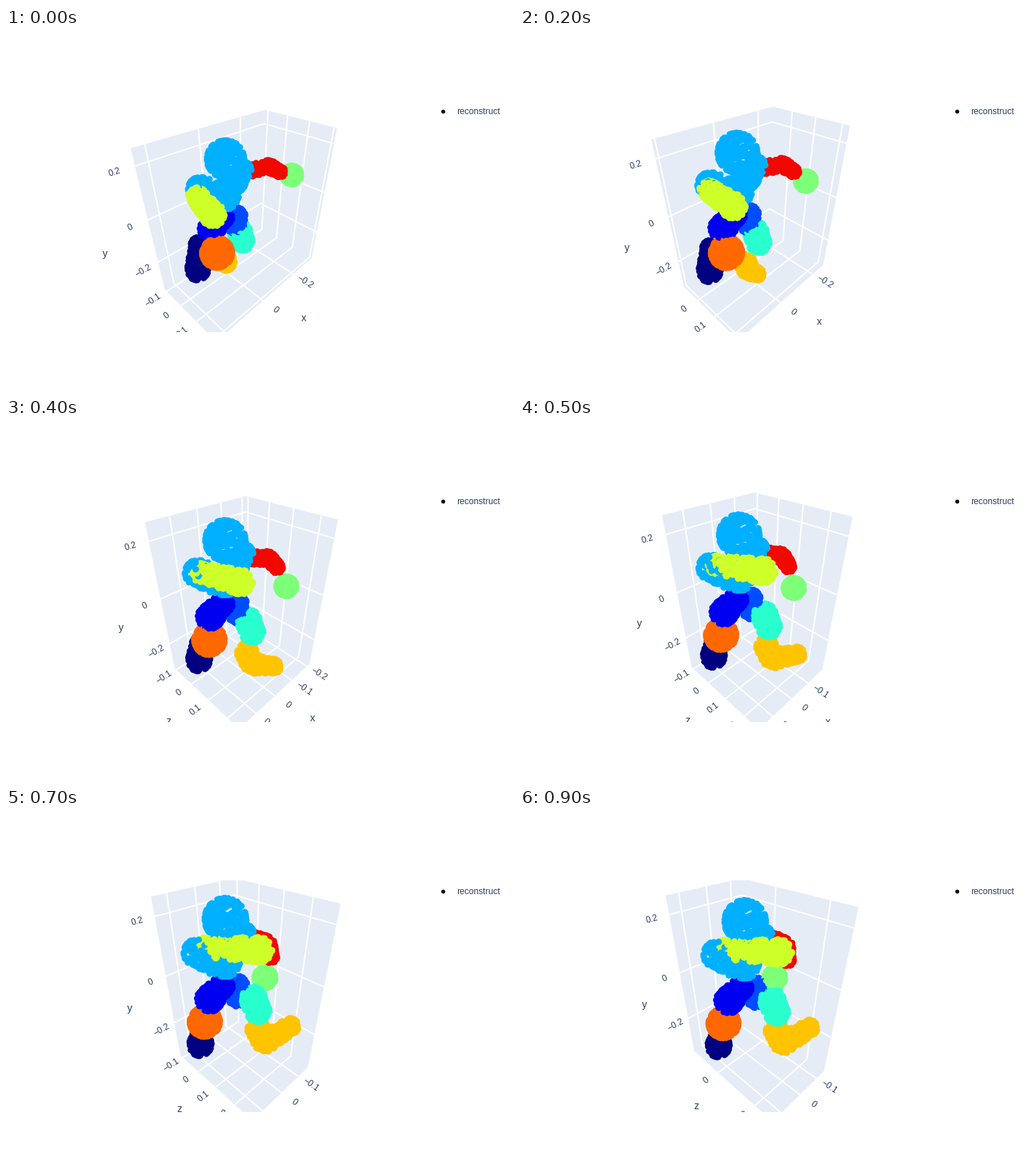
Animation of 700 by 500 pixels, one loop 1 s. Source, as a matplotlib script:

```python
import numpy as np
import matplotlib.pyplot as plt
from matplotlib.animation import FuncAnimation
from matplotlib.colors import to_rgb
from matplotlib.patches import Polygon, Rectangle

DPI = 100
PX = 72 / DPI
FRAMES, INTERVAL = 10, 100
INK, WALL = "#2a3f5f", "#e5ecf6"
CENTER = np.array([326, 260])
FOCAL = 160 / np.tan(np.pi / 8)
EYE = 1.25 * np.sqrt(3)
LABEL_GAP, TITLE_GAP = 0.128, 0.33
DOT, DOT_MARGIN = 9, 0.01

plt.rcParams["font.family"] = "Liberation Sans"
fig = plt.figure(figsize=(7, 5), dpi=DPI, facecolor="white")
ax = fig.add_axes([0, 0, 1, 1])
rng = np.random.default_rng(4)


def swing(frame, pace):
    t = min(frame / pace, 1)
    return t * t * (3 - 2 * t)


def axis_limits(frame):
    """The data range on x, y and z, which follows the stride."""
    narrow = np.sin(np.pi / 2 * frame / 9)
    lift = np.exp(-((frame - 3.2) / 1.5) ** 2)
    back = np.interp(frame, [0, 1, 3, 4, 8, 9], [-.116, -.086, -.098, -.112, -.12, -.159])
    return np.array([
        (-.342 + .192 * narrow, .245 - .102 * narrow),
        (-.356 - .0022 * frame + .045 * lift, .256),
        (back, .211 + .071 * swing(frame, 7))])


class Part:
    """Dots on the skin of a chain of balls that swings from one pose to another."""

    def __init__(self, color, radii, start, end=None, arc=(0, 0, 0), pace=7, count=240):
        self.color, self.pace = to_rgb(color), pace
        self.start = np.array(start)
        self.end = self.start if end is None else np.array(end)
        self.arc = np.array(arc)
        links = np.arange(len(radii))
        self.along = rng.uniform(-.35, links[-1] + .35, count).clip(0, links[-1])
        skin = rng.normal(size=(count, 3))
        skin /= np.linalg.norm(skin, axis=1, keepdims=True)
        radius = np.interp(self.along, links, radii) - DOT_MARGIN
        self.skin = skin * radius[:, None]

    def dots(self, frame):
        s = swing(frame, self.pace)
        joints = self.start + (self.end - self.start) * s + self.arc * s * (1 - s)
        links = np.arange(len(joints))
        return self.skin + np.column_stack([np.interp(self.along, links, v) for v in joints.T])


BODY = [
    # head and trunk
    Part("#00b0ff", [.07], [(0, .187, .018)], count=330),
    Part("#00b0ff", [.041, .06, .049],
         [(-.098, .108, 0), (0, .035, 0), (.098, .108, 0)], count=480),
    # hips
    Part("#004cff", [.042, .042], [(-.05, -.065, .015), (-.05, -.122, .01)]),
    Part("#0000f1", [.046, .052], [(.02, -.04, .01), (.07, -.07, .004)], count=320),
    # far arm
    Part("#f10800", [.032, .034, .03],
         [(-.135, .1, .014), (-.2, .103, .036), (-.255, .064, .052)],
         [(-.125, .095, .018), (-.13, .086, .07), (-.125, .04, .087)],
         arc=(0, -.05, 0), pace=9, count=300),
    Part("#7dff7a", [.047], [(-.305, .041, .074)], [(-.11, -.04, .046)],
         arc=(-.045, -.2, .12), pace=9),
    # near arm
    Part("#ceff29", [.038, .044], [(.13, .105, .024), (.15, .093, .124)],
         [(.075, .12, .005), (.005, .14, .158)], count=330),
    # near leg
    Part("#ff6800", [.063], [(.1, -.127, .067)], [(.08, -.18, -.023)], count=300),
    Part("#000080", [.036, .054], [(.11, -.144, -.036), (.11, -.297, -.059)],
         [(.08, -.26, -.06), (.08, -.328, -.07)], count=340),
    # far leg
    Part("#29ffce", [.051, .051], [(-.06, -.145, .02), (-.06, -.185, .035)],
         [(-.06, -.095, .08), (-.06, -.135, .105)], arc=(0, -.06, .02), count=320),
    Part("#ffc400", [.048, .048, .035],
         [(-.02, -.315, -.03), (-.02, -.325, -.03), (-.02, -.33, -.02)],
         [(-.06, -.22, .107), (-.06, -.265, .142), (-.06, -.12, .245)],
         arc=[(0, -.07, .07), (0, -.12, .1), (0, -.19, .27)], count=440),
]


def depth(p):
    return EYE - np.sum(p, axis=-1) / np.sqrt(3)


def project(p):
    x, y, z = np.transpose(p)
    view = np.array([(z - x) / np.sqrt(2), (x + z - 2 * y) / np.sqrt(6)])
    return CENTER + (FOCAL * view / depth(p)).T


def write(p, text, size, angle=0):
    ax.text(*p, text, fontsize=size * PX, color=INK, rotation=angle,
            ha="center", va="center", zorder=2)


def tick_text(value):
    return f"{value:.1f}".replace("-", "\u2212") if abs(value) > .01 else "0"


def draw_box(limits, scale):
    spans = np.ptp(limits, axis=1)
    a, b, c = spans * scale / 2
    outline = [(a, b, -c), (-a, b, -c), (-a, b, c), (-a, -b, c), (a, -b, c), (a, -b, -c)]
    ax.add_patch(Polygon(project(outline), fc=WALL, ec="none", zorder=0))

    # Each grid line folds once where two faces meet and ends at its label.
    folds = [
        lambda t: [(t, b, -c), (t, -b, -c), (t, -b, c)],
        lambda t: [(-a, t, c), (-a, t, -c), (a, t, -c)],
        lambda t: [(-a, b, t), (-a, -b, t), (a, -b, t)]]
    outward = np.array([(0, 0, 1), (1, 0, 0), (1, 0, 0)])
    for name, fold, out, (low, high) in zip("xyz", folds, outward, limits):
        step = 0.2 if high - low > 0.42 else 0.1
        for n in range(int(np.ceil(low / step)), int(np.floor(high / step)) + 1):
            path = fold((n * step - (low + high) / 2) * scale)
            ax.plot(*project(path).T, color="white", lw=2 * PX,
                    solid_capstyle="butt", zorder=1)
            end, spot = project(path[-1]), project(path[-1] + out * LABEL_GAP)
            dx, dy = spot - end
            write(spot, tick_text(n * step), 12, -np.degrees(np.arctan(dy / dx)))
        write(project(fold(0)[-1] + out * TITLE_GAP), name, 14)


def draw_body(frame, limits, scale):
    clouds = [part.dots(frame) for part in BODY]
    dots = (np.vstack(clouds) - limits.mean(axis=1)) * scale
    colors = np.repeat([part.color for part in BODY], [len(c) for c in clouds], axis=0)
    far_first = np.argsort(-depth(dots))
    ax.scatter(*project(dots[far_first]).T, s=(DOT * PX) ** 2,
               c=colors[far_first], linewidths=0, zorder=3)


def draw(frame):
    ax.clear()
    ax.set(xlim=(0, 700), ylim=(500, 0))
    ax.axis("off")
    limits = axis_limits(frame)
    scale = np.prod(np.ptp(limits, axis=1)) ** (-1 / 3)
    draw_box(limits, scale)
    draw_body(frame, limits, scale)

    scene = Rectangle((80, 100), 492, 320, transform=ax.transData)
    for artist in [*ax.lines, *ax.patches, *ax.collections, *ax.texts]:
        artist.set_clip_on(True)
        artist.set_clip_path(scene)

    ax.scatter(601.5, 114.5, s=(5.5 * PX) ** 2, c="black", linewidths=0)
    ax.text(621.5, 119, "reconstruct", fontsize=12 * PX, color=INK, va="baseline")
    return []


anim = FuncAnimation(fig, draw, frames=FRAMES, init_func=lambda: [],
                     interval=INTERVAL, repeat=True, repeat_delay=0)
plt.show()
```
